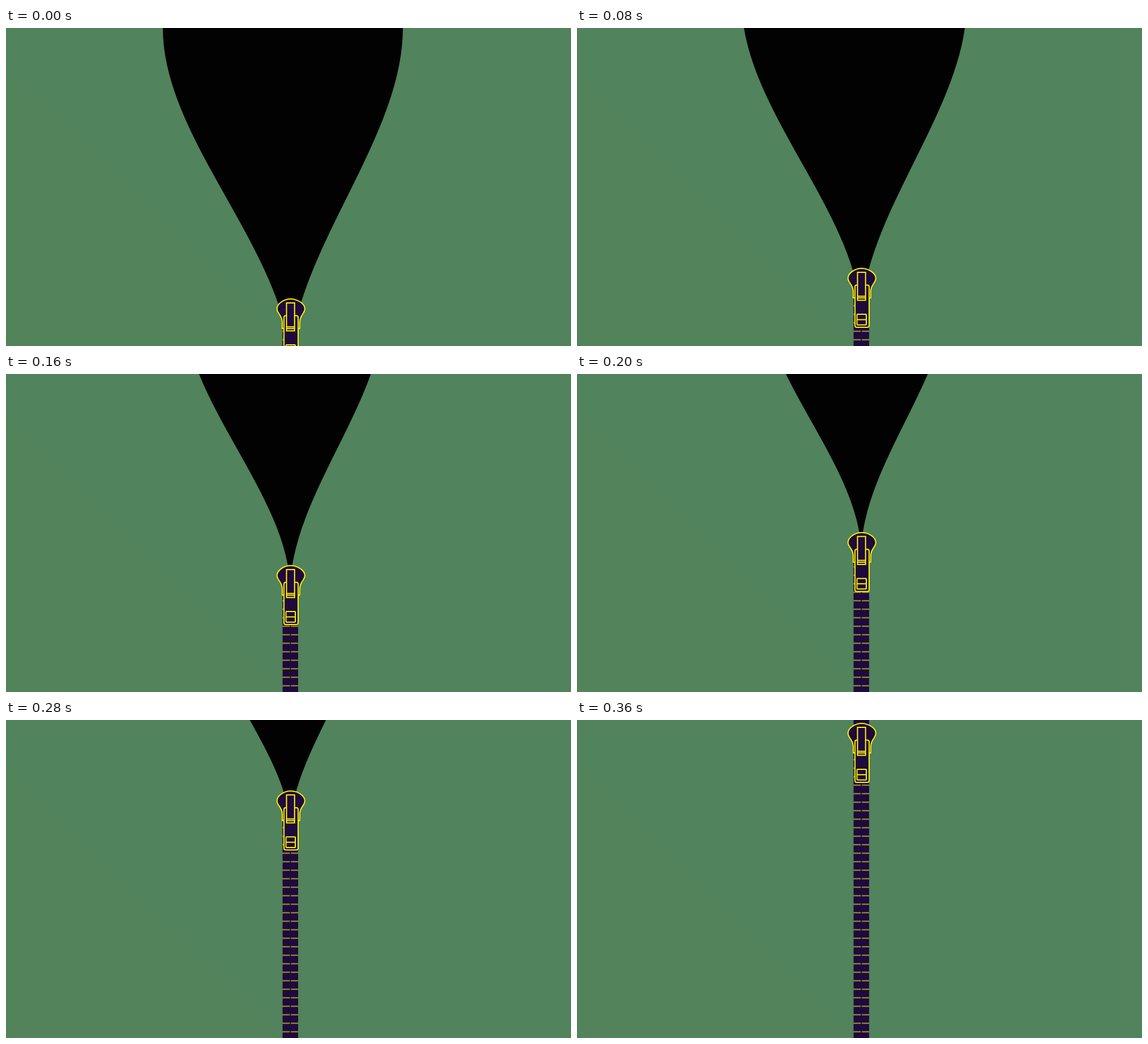
These frames come from a looping animation (998x561 px, 1.28 s). An HTML page:

```html
<!DOCTYPE html>
<html lang="en">
<head>
<meta charset="utf-8">
<title>Zipper</title>
<style>
  html, body { margin: 0; width: 100%; height: 100%; overflow: hidden; background: #51835c; }
  svg { display: block; width: 998px; height: 561px; }
  .metal { fill: #1e0a3c; stroke: #fff200; stroke-width: 2; }
</style>
</head>
<body>
<svg viewBox="0 0 998 561">
  <defs>
    <pattern id="teeth" x="488.5" y="2.5" width="27.5" height="15" patternUnits="userSpaceOnUse">
      <rect width="27.5" height="15" fill="#1e0a3c"/>
      <path d="M0 7.5H12.8M14.6 7.5H27.5" stroke="#d2cb25" stroke-width="1.4"/>
    </pattern>
  </defs>
  <rect width="998" height="561" fill="#51835c"/>
  <path d="M0 74L485 550V561H0Z" fill="#53835b"/>
  <path id="gap" fill="#020202"/>
  <rect id="strip" x="488.5" width="27.5" height="561" fill="url(#teeth)"/>
  <g id="slider" class="metal">
    <path d="M488 52V41C488 29 478.7 25.5 478.7 17.5C478.7 9 490 0 503 0C516 0 527.8 9 527.8 17.5C527.8 25.5 518.8 29 518.8 41V52Z"/>
    <rect x="491" y="29.5" width="25" height="74.5" rx="3"/>
    <rect x="495.5" y="7" width="14.2" height="49.3"/>
    <path d="M495.5 49.2H509.7M495.5 52.3H509.7"/>
    <rect x="494.5" y="81" width="16.5" height="18.7" rx="1"/>
    <path d="M494.5 90.5H511"/>
  </g>
</svg>
<script>
const STEP = 40, LOOP = 1280, LAST = 9;
const SEAM = 502, LEFT = 225, RIGHT = 199, HEIGHT = 600;

const el = id => document.getElementById(id);
const gap = el('gap'), strip = el('strip'), slider = el('slider');

// The slider speeds up until it reaches its stop near the top.
const sliderTop = n => Math.max(6, 478 - n * (20.8 + 2.64 * n + 0.227 * n * n));

// The opening shrinks toward the seam while its tip rises.
function gapPath(n) {
  const rise = Math.max(n - 1, n * 0.35) ** 0.89;
  const scale = 1 - 0.063 * rise;
  const tip = HEIGHT - 82 * rise;
  const top = tip - HEIGHT * scale;
  const upper = top + HEIGHT * scale / 3, lower = tip - HEIGHT * scale / 3;
  const l = SEAM - LEFT * scale, r = SEAM + RIGHT * scale;
  return `M${l} ${top}C${l} ${upper} ${SEAM} ${lower} ${SEAM} ${tip}` +
    `C${SEAM} ${lower} ${r} ${upper} ${r} ${top}Z`;
}

function draw(ms) {
  const n = Math.min(Math.floor(ms / STEP), LAST);
  const top = sliderTop(n), closed = n === LAST;
  gap.setAttribute('d', closed ? '' : gapPath(n));
  strip.setAttribute('y', closed ? 0 : top + 30);
  slider.setAttribute('transform', `translate(0 ${top})`);
}

const start = performance.now();
function tick() {
  draw((performance.now() - start) % LOOP);
  requestAnimationFrame(tick);
}
draw(0);
requestAnimationFrame(tick);
</script>
</body>
</html>
```
